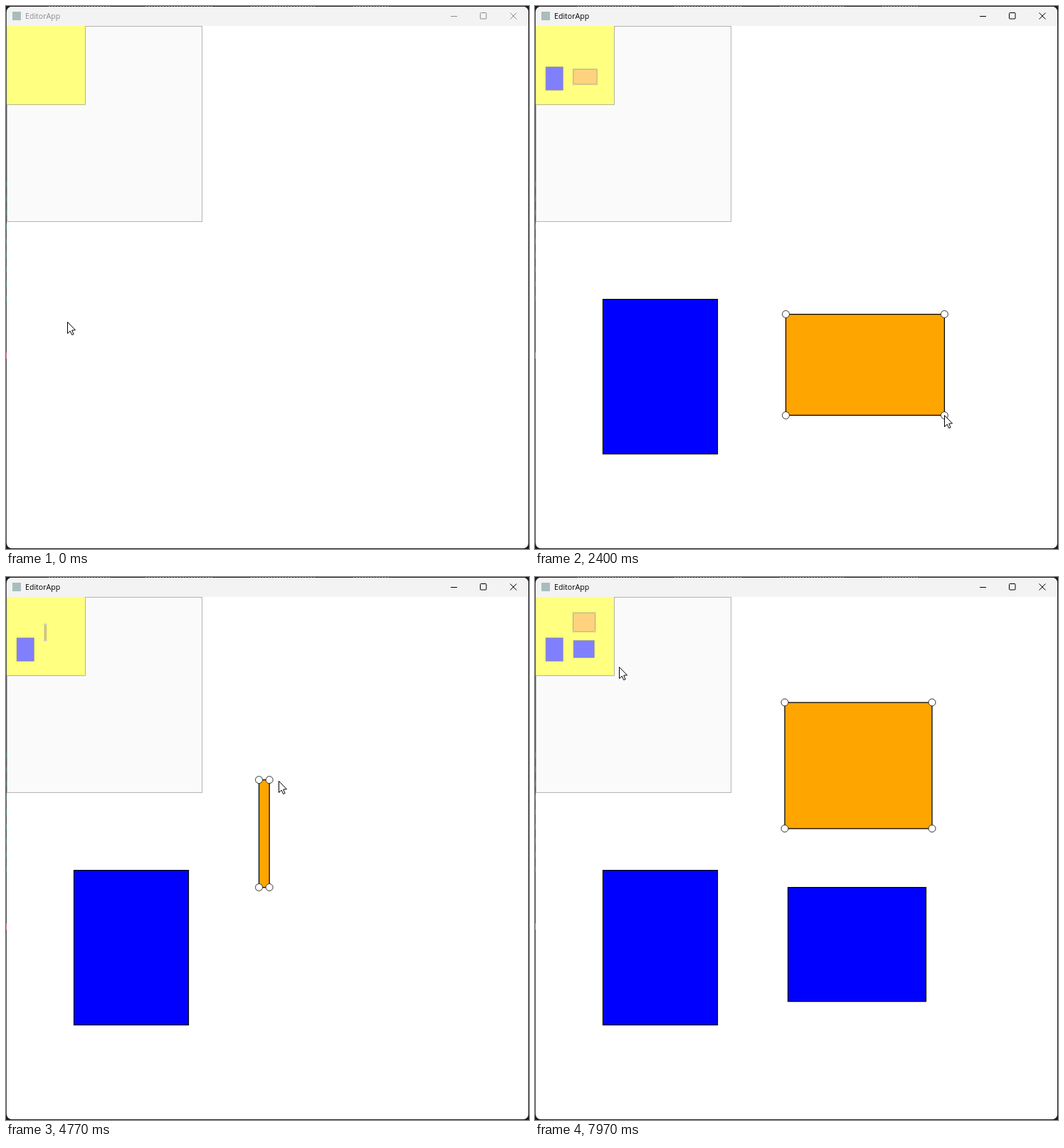
Animation of 735x762 px, one loop 8000 ms. Source, as an HTML page with a canvas:

```html
<!DOCTYPE html>
<html lang="en">
<head>
<meta charset="utf-8">
<title>EditorApp</title>
<style>
  html, body { margin: 0; width: 100%; height: 100%; overflow: hidden; background: #fff; }
  canvas { display: block; }
</style>
</head>
<body>
<canvas id="stage" width="735" height="762"></canvas>
<script>
const W = 735, H = 762, LOOP = 8000, STEP = 100 / 3;
const ctx = document.getElementById('stage').getContext('2d');

const HOME = { x: 86, y: 443 };
const ACTIVATE = 300;  // window gains focus
const REGRAB = 2805;   // second box is picked up again
const NUDGE = 3;       // its anchor shifts a little then
const LAG = 12;        // dragged corner trails the pointer

// Pointer strokes, each eased from where the last one stopped
const move = (start, end, x, y, bend = 0) => ({ start, end, x, y, bend });
const MOVES = [
  move(0, 230, 95, 411),
  move(390, 1111, 256, 628, 7),
  move(1140, 1670, 352, 432),
  move(1785, 2395, 575, 574),
  move(REGRAB, 3430, 143, 543),
  move(3680, 4242, 161, 251),
  move(4480, 5022, 570, 316),
  move(5022, 5310, 587, 321),
  move(5310, 5830, 543, 583),
  move(5830, 6040, 549, 595),
  move(6170, 6570, 350.5, 175.5, 78),
  move(6715, 7330, 557.5, 352.5),
  move(7500, 7600, 570, 367),
  move(7600, 7960, 118, 126)
];

// A box stays selected until the next one is started
const BOXES = [
  { start: 390, drop: 1135 },
  { start: 1785, drop: 6100 },
  { start: 6715, drop: 7450 }
];

function pointer(t) {
  let at = HOME;
  for (const m of MOVES) {
    if (t < m.start) break;
    if (t < m.end) {
      const u = (t - m.start) / (m.end - m.start);
      const s = u * u * (3 - 2 * u);
      const dx = m.x - at.x, dy = m.y - at.y;
      const bow = 4 * s * (1 - s) * m.bend / Math.hypot(dx, dy);
      return { x: at.x + dx * s - dy * bow, y: at.y + dy * s + dx * bow };
    }
    at = m;
  }
  return at;
}

function boxAt(box, i, t) {
  const time = Math.max(box.start, Math.min(t, box.drop) - LAG);
  const shift = i === 1 && time > REGRAB ? NUDGE : 0;
  const anchor = pointer(box.start), corner = pointer(time);
  const x = anchor.x + shift, y = anchor.y + shift;
  return {
    x0: Math.min(x, corner.x), y0: Math.min(y, corner.y),
    x1: Math.max(x, corner.x), y1: Math.max(y, corner.y),
    selected: i === BOXES.length - 1 || t < BOXES[i + 1].start
  };
}

function fillRect(color, x, y, w, h) {
  ctx.fillStyle = color;
  ctx.fillRect(x, y, w, h);
}

function line(color, ...pts) {
  ctx.strokeStyle = color;
  ctx.lineWidth = 1;
  ctx.beginPath();
  pts.forEach(([x, y]) => ctx.lineTo(x, y));
  ctx.stroke();
}

const FULL = {
  map: (x, y) => [x + 0.5, y + 0.5],
  on: '#ffa500', off: '#0000ff', pen: '#000', width: 1.25, radius: 5, ring: '#333'
};
const MINI = {
  map: (x, y) => [1 + (x - 0.5) * 0.15, 28 + (y - 27.5) * 0.15],
  on: '#ffd280', off: '#8080ff', pen: '#808080', width: 0.6, radius: 0.9, ring: '#a0a0a0'
};

function drawBox(b, style) {
  const [x0, y0] = style.map(b.x0, b.y0), [x1, y1] = style.map(b.x1, b.y1);
  ctx.fillStyle = b.selected ? style.on : style.off;
  ctx.strokeStyle = style.pen;
  ctx.lineWidth = style.width;
  ctx.beginPath();
  ctx.rect(x0, y0, x1 - x0, y1 - y0);
  ctx.fill();
  ctx.stroke();
  if (!b.selected) return;
  ctx.fillStyle = '#fff';
  ctx.strokeStyle = style.ring;
  ctx.lineWidth = Math.min(1, style.radius / 2);
  for (const x of [x0, x1]) for (const y of [y0, y1]) {
    ctx.beginPath();
    ctx.arc(x, y, style.radius, 0, 7);
    ctx.fill();
    ctx.stroke();
  }
}

function drawWindow(active) {
  fillRect('#1c1d20', 0, 0, W, H);
  // Fragments of what lies behind the window
  for (let x = 60; x < 540; x += 4)
    if (x % 145 > 50) fillRect('#6d7076', x, 0, 2, 1);

  ctx.fillStyle = '#fff';
  ctx.beginPath();
  ctx.roundRect(1, 1, W - 2, H - 2, 7);
  ctx.fill();
  ctx.save();
  ctx.clip();
  fillRect('#f3f3f3', 0, 0, W, 28);
  ctx.restore();

  fillRect('#4a4b4e', 0, 8, 1, H - 16);
  for (let y = 246; y < 420; y += 20) fillRect('#45706f', 0, y, 1, 8);
  fillRect('#d0628a', 0, 486, 1, 9);

  fillRect('#a9bdbd', 9, 8, 12, 12);
  const ink = active ? '#000' : '#8c8c8c';
  ctx.fillStyle = ink;
  ctx.font = '10.6px "Open Sans", "Noto Sans", sans-serif';
  ctx.fillText('EditorApp', 27, 18);
  line(ink, [625, 14.5], [634, 14.5]);
  ctx.beginPath();
  ctx.roundRect(666.5, 9.5, 8.5, 8.5, 1);
  ctx.stroke();
  line(ink, [708.5, 9.5], [717.5, 18.5]);
  line(ink, [717.5, 9.5], [708.5, 18.5]);
}

function drawOverview(boxes) {
  fillRect('#fafafa', 1, 28, 274, 274);
  ctx.strokeStyle = '#b4b4b4';
  ctx.lineWidth = 1;
  ctx.strokeRect(1.5, 28.5, 274, 274);
  fillRect('#ffff80', 1, 28, 110, 110);
  line('#b4b4a0', [111.5, 28], [111.5, 138.5], [1, 138.5]);
  boxes.forEach(b => drawBox(b, MINI));
}

function drawPointer({ x, y }) {
  const shape = [[0, 0], [0, 16], [3.7, 12.6], [6.2, 18], [8.6, 17], [6.2, 11.6], [11, 11.3]];
  ctx.beginPath();
  shape.forEach(([px, py]) => ctx.lineTo(Math.round(x) + 0.5 + px, Math.round(y) + 0.5 + py));
  ctx.closePath();
  ctx.fillStyle = '#fff';
  ctx.fill();
  ctx.strokeStyle = '#000';
  ctx.lineWidth = 1;
  ctx.stroke();
}

function draw(t) {
  const boxes = BOXES.filter(b => t >= b.start).map((b, i) => boxAt(b, i, t));
  drawWindow(t >= ACTIVATE);
  boxes.forEach(b => drawBox(b, FULL));
  drawOverview(boxes);
  drawPointer(pointer(t));
}

const begin = performance.now();
function tick() {
  const t = (performance.now() - begin) % LOOP;
  draw(Math.floor((t + 5) / STEP) * STEP % LOOP);
  requestAnimationFrame(tick);
}
tick();
</script>
</body>
</html>
```
